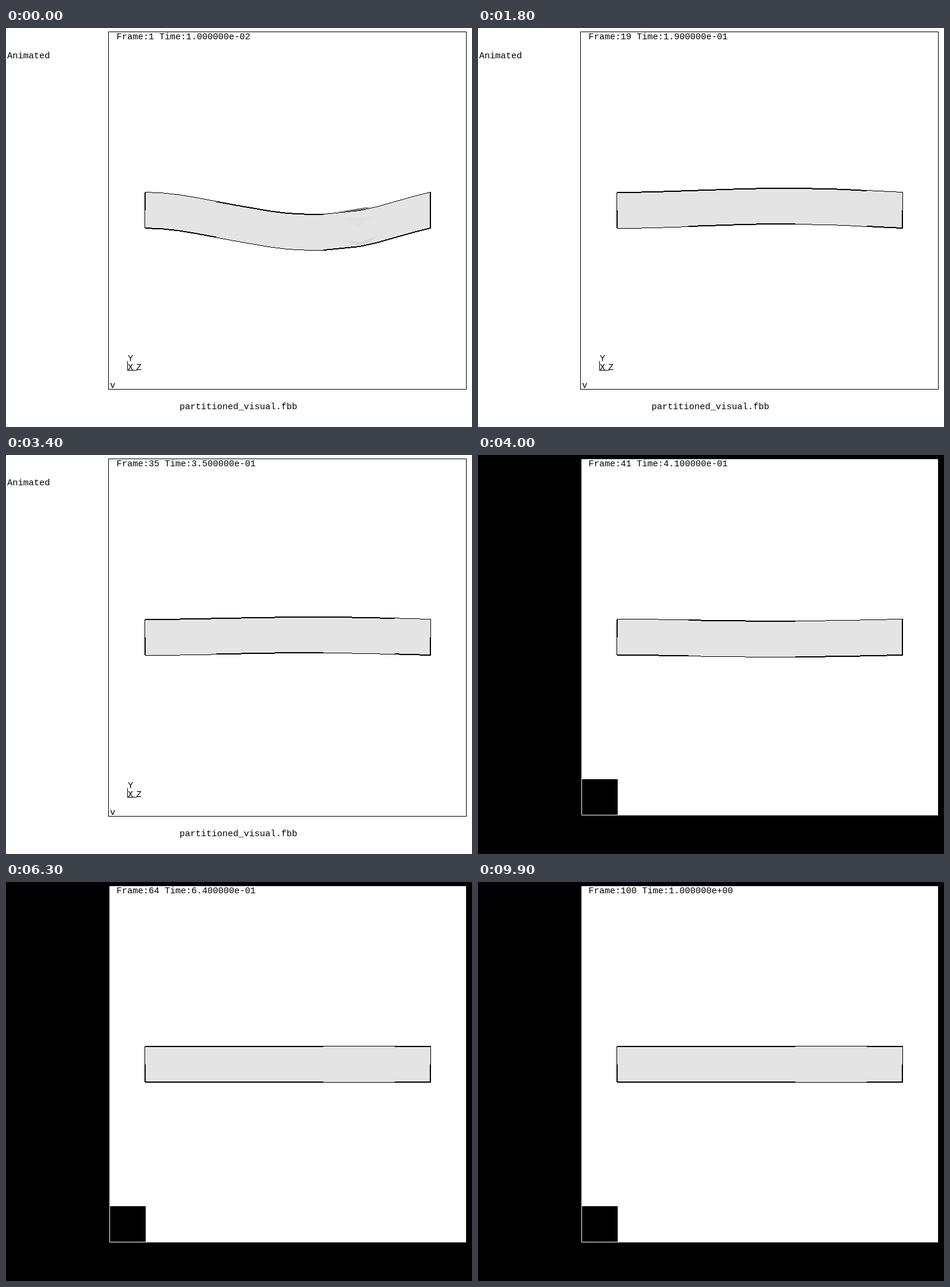
Write an HTML page with a canvas that moves like this. It is 784 px wide and 672 px high and loops after 10000 ms.

```html
<!DOCTYPE html>
<html lang="en">
<head>
<meta charset="utf-8">
<title>Beam vibration</title>
<style>
  html, body { margin: 0; width: 100%; height: 100%; overflow: hidden; background: #fff; }
  canvas { display: block; }
</style>
</head>
<body>
<canvas id="stage" width="784" height="672"></canvas>
<script>
const ctx = document.getElementById('stage').getContext('2d');
const LEFT = 234, RIGHT = 714, TOP = 276, BOTTOM = 337, STEP = 30;

// Relative deflection every STEP pixels along the beam
const SHAPE = [0, .04, .13, .27, .42, .57, .71, .85, .95, .99, 1, .92, .84, .66, .43, .2, 0];

function rect(color, x, y, w, h) {
  ctx.fillStyle = color;
  ctx.fillRect(x, y, w, h);
}

function poly(color, ...points) {
  ctx.fillStyle = color;
  ctx.beginPath();
  for (const [x, y] of points) ctx.lineTo(x, y);
  ctx.fill();
}

function label(text, x, y) {
  ctx.fillStyle = '#000';
  ctx.fillText(text, x, y);
}

// Damped oscillation of the most deflected point, in pixels
function deflection(n) {
  const size = 29.2 * Math.exp(-.265 * (n - 1)) + 7.8 * Math.exp(-((n / 43) ** 2.6));
  return size * Math.cos(2 * Math.PI * (n - 1) / 4.03);
}

function shapeAt(x) {
  const u = (x - LEFT) / STEP;
  const i = Math.min(Math.floor(u), SHAPE.length - 2);
  return SHAPE[i] + (SHAPE[i + 1] - SHAPE[i]) * (u - i);
}

function drawLightPage() {
  rect('#fff', 0, 0, 784, 672);
  ctx.strokeStyle = '#000';
  ctx.strokeRect(172.5, 6.5, 602, 602);
  label('Animated', 2, 51);
  label('partitioned_visual.fbb', 292, 642);
  label('Y', 205, 561);
  label('X', 205, 576);
  label('Z', 219, 576);
  label('v', 175, 606);
  rect('#000', 204, 561, 1, 16);
  rect('#000', 204, 576, 16, 1);
}

function drawDarkPage() {
  rect('#000', 0, 0, 784, 672);
  rect('#fff', 174, 7, 600, 600);
  rect('#000', 175, 546, 60, 60);
}

// Creases around the joint while the beam is strongly bent
function drawDent(d) {
  ctx.save();
  ctx.globalAlpha = Math.max(0, Math.min(1, (d - 18) / 19));
  ctx.translate(0, d - 37);
  poly('#777', [556, 310], [605, 302], [613, 302], [592, 308]);
  poly('#e0e0e0', [568, 320], [616, 318], [592, 336]);
  poly('#d4d4d4', [567, 358], [597, 361], [626, 349], [612, 360], [597, 366]);
  ctx.restore();
}

function drawBeam(d) {
  const down = d > 1, up = d < -1;
  const columns = [];
  for (let x = LEFT; x <= RIGHT; x++) {
    const dy = Math.round(d * shapeAt(x));
    columns.push([x, dy]);
    rect('#e4e4e4', x, TOP + dy, 1, BOTTOM - TOP + 1);
  }
  drawDent(d);
  for (const [x, dy] of columns) {
    const middle = x >= 354 && x < 534;
    const joint = x >= 534 && x < 654;
    const topThick = down ? middle : up ? x < 654 : !joint;
    const bottomThick = down ? !middle : up ? middle || x >= 654 : !joint;
    rect('#000', x, TOP + dy, 1, topThick ? 2 : 1);
    rect('#000', x, BOTTOM + dy - bottomThick, 1, bottomThick ? 2 : 1);
  }
  rect('#000', LEFT - 1, TOP + 1, 1, 60);
  rect('#000', LEFT, down ? TOP : 307, 1, 31);
  rect('#000', RIGHT, TOP, 1, 61);
  rect('#000', RIGHT - 1, down ? TOP : 307, 1, down ? 61 : 31);
}

function draw() {
  const n = Math.floor(performance.now() / 100) % 100 + 1;
  const time = (n / 100).toExponential(6).replace(/\d$/, '0$&');
  ctx.font = '15px "Liberation Mono", monospace';
  if (n < 40) drawLightPage(); else drawDarkPage();
  label(`Frame:${n} Time:${time}`, 186, 19);
  drawBeam(deflection(n));
  requestAnimationFrame(draw);
}
draw();
</script>
</body>
</html>
```
